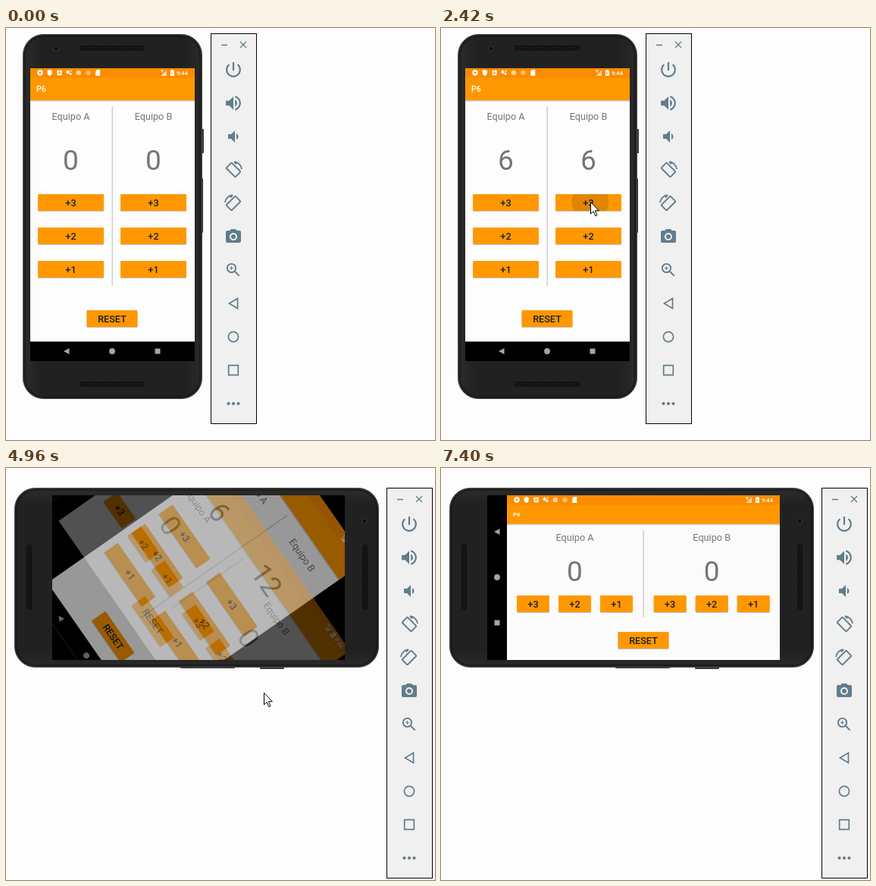
Write an HTML page that moves like this. It is 566 by 543 pixels and loops after 8240 ms.

```html
<!DOCTYPE html>
<html lang="es">
<head>
<meta charset="utf-8">
<title>Marcador</title>
<style>
  html, body { margin: 0; width: 100%; height: 100%; overflow: hidden; background: #fdfdfd }
  #stage { display: block; font-family: Roboto, "Open Sans", sans-serif }
  text { text-anchor: middle }
  .team { font-size: 12.67px; fill: #757575 }
  .score { font-size: 37px; fill: #757575 }
  .label { font-size: 12.67px; font-weight: 500; fill: #1d1d1d }
  .bar { font-weight: 500; fill: #fff; text-anchor: start }
  .line { fill: none; stroke: #607d8b; stroke-width: 1.9 }
</style>
</head>
<body>
<svg id="stage" width="566" height="543" viewBox="0 0 566 543"></svg>
<script>
const LOOP = 8240, TURN = 4200, ROTATE = 4960;

// Spans in which the picture changes: start, end, number of steps
const spans = [[60, 580, 8], [740, 1540, 12], [1620, 1840, 4], [1980, 2800, 12], [2880, 3320, 7],
  [3460, 3680, 4], [3820, 4060, 4], [4200, 4280, 2], [4660, 4800, 3], [4960, 5760, 12],
  [5840, 6660, 12], [6720, 7400, 10]];

// Pointer path: time, x, y
const path = [[60, 431, 498], [580, 90, 318], [900, 90, 318], [1080, 97, 275], [1250, 98, 273],
  [1394, 105, 249], [1540, 103, 232], [1600, 103, 232], [1840, 197, 229], [3400, 197, 229],
  [3533, 236, 227], [3680, 273, 231], [3800, 273, 231], [3930, 304, 216], [4060, 295, 230],
  [4640, 295, 230], [4800, 339, 299], [4940, 339, 299], [5178, 352, 262], [5760, 371, 152],
  [5820, 371, 152], [6100, 164, 140], [6362, 222, 103], [6660, 199, 137], [6700, 199, 137],
  [7400, 530, 545]];

// Button presses: time, team, points
const presses = [[740, 0, 1], [1180, 0, 2], [1540, 0, 3],
  [1980, 1, 3], [2300, 1, 3], [2620, 1, 3], [2960, 1, 3]];

const rect = (x, y, w, h, fill, more = '') =>
  `<rect x="${x}" y="${y}" width="${w}" height="${h}" fill="${fill}" ${more}/>`;
const circle = (x, y, r, more = '') => `<circle cx="${x}" cy="${y}" r="${r}" ${more}/>`;
const text = (x, y, cls, s, more = '') => `<text x="${x}" y="${y}" class="${cls}" ${more}>${s}</text>`;
const button = (cx, cy, w, s) =>
  rect(cx - w / 2, cy - 10, w, 22, '#000', 'opacity=".22" rx="1.5"') +
  rect(cx - w / 2, cy - 11, w, 22, '#ff9800', 'rx="1"') + text(cx, cy + 4.5, 'label', s);

function statusBar(left, right, y) {
  const at = n => left + 13 + n * 12.7;
  return `<g fill="#fff">
    ${circle(at(0), y, 2.4, 'fill="none" stroke="#fff" stroke-width="2"')}
    ${circle(at(0), y, 3.7, 'fill="none" stroke="#fff" stroke-dasharray="1.4 1.5"')}
    <path d="M${at(1)} ${y - 4}l3.2 1.3v2.4q0 3-3.2 4.3q-3.2-1.3-3.2-4.3v-2.4z"/>
    ${rect(at(2) - 3, y - 3.3, 6.4, 6.6, '#fff', 'rx="1"')}
    <path d="M${at(2) - 1.6} ${y + 2}l1.8-4.2l1.8 4.2m-3-1.4h2.4" fill="none" stroke="#fb8c00" stroke-width=".8"/>
    ${circle(at(3) - 1.5, y - 1, 2.2)}${circle(at(3) + 2, y + 1.5, 1.6)}${circle(at(3) + 2.6, y - 2.5, 1)}
    ${circle(at(4), y, 3.3, 'opacity=".6"')}
    ${circle(at(5), y, 3.3, 'opacity=".4"')}
    <path d="M${at(6) - 3} ${y + 4}v-6l2-2h4v8z"/>
    <path d="M${right - 37} ${y - 3.5}v7.5h-7.5z" opacity=".65"/>
    <path d="M${right - 45} ${y - 3}h4m-2 0v3" stroke="#fff" fill="none"/>
    <path d="M${right - 32} ${y - 3}h1.3v-1h2.4v1h1.3v7h-5z"/>
    <path d="M${right - 30} ${y - 1.5}l-.8 2.2h1.4l-.8 2" stroke="#fb8c00" stroke-width=".7" fill="none"/>
    ${text(right - 24, y + 2.9, 'bar', '9:44', 'font-size="7.6"')}</g>`;
}

const appBar = (x, y, w, h, size) =>
  rect(x, y + 13, w, h + 1.2, '#000', 'opacity=".18"') +
  rect(x, y, w, 13, '#fb8c00') + rect(x, y + 12.7, w, h, '#ff9800') +
  statusBar(x, x + w, y + 6) +
  text(x + 8, y + 12.7 + h / 2 + size * .36, 'bar', 'P6', `font-size="${size}"`);

const navIcons = (x, y, dx, dy) => `<g fill="#a5a5a5">
  <path d="M${x - 4} ${y}l7.5-4v8z"/>${circle(x + dx, y + dy, 3.9)}
  ${rect(x + 2 * dx - 3.5, y + 2 * dy - 3.5, 7, 7, '#a5a5a5')}</g>`;

const portrait = rect(32, 53, 217, 386, '#fdfdfd') + appBar(32, 53, 217, 29.6, 10.6) +
  rect(139.5, 103, 1.4, 237, '#cbcbcb') +
  [0, 1].map(i => {
    const cx = 85.5 + 109 * i;
    return text(cx, 121.3, 'team', 'Equipo ' + 'AB'[i]) + text(cx, 187, 'score', 0, `id="score${i}"`) +
      [3, 2, 1].map(n => button(cx, 362 - 44 * n, 87, '+' + n)).join('');
  }).join('') +
  '<svg id="ripple" width="87" height="22"><circle/></svg>' +
  button(140, 383, 67, 'RESET') + rect(32, 413.3, 217, 25.7, '#000') + navIcons(80, 426, 60, 0);

const landscape = rect(61, 36, 386, 217, '#fbfbfb') + appBar(87, 36, 360, 25, 8) +
  rect(266.5, 82, 1.4, 115, '#cbcbcb') +
  [0, 1].map(i => {
    const cx = 176.5 + 180.7 * i;
    return text(cx, 95.5, 'team', 'Equipo ' + 'AB'[i]) + text(cx, 148.5, 'score', 0) +
      [3, 2, 1].map(n => button(cx + (2 - n) * 55, 179, 43, '+' + n)).join('');
  }).join('') +
  button(267, 227, 67, 'RESET') + rect(61, 36, 26, 217, '#000') + navIcons(74, 84, 0, 60);

const speaker = y => rect(97, y, 86, 7, '#101010', 'rx="3"') +
  `<path d="M99 ${y + 2.5}h82m-81 2.5h82" stroke="#303030" stroke-dasharray="1 2"/>`;

const body = rect(255, 133, 6, 32, '#3a3a3a', 'rx="1"') + rect(255, 198, 5, 72, '#303030', 'rx="1"') +
  rect(22.5, 8.5, 236, 480, 'url(#shell)', 'rx="27" stroke="#484848"') +
  rect(25, 11, 231, 475, 'none', 'rx="25" stroke="#191919" stroke-width="1.5"') +
  speaker(23) + speaker(466) + circle(66, 27, 3, 'fill="#0c0c10" stroke="#393939"') +
  rect(32, 53, 217, 386, '#000');

const rotateIcon = `<rect x="7" y="3.5" width="10" height="17" rx="1" class="line" transform="rotate(-45 12 12)"/>
  <path d="M13 1.3A11 11 0 0 1 23 11M13 1.3l3 3" class="line" stroke-width="1.5"/>`;
const icons = [
  '<path transform="translate(-1.2 -1.2) scale(1.1)" d="M13 3h-2v10h2V3zm4.83 2.17l-1.42 1.42C17.99 7.86 19 9.81 19 12c0 3.87-3.13 7-7 7s-7-3.13-7-7c0-2.19 1.01-4.14 2.58-5.42L6.17 5.17C4.23 6.82 3 9.26 3 12c0 4.97 4.03 9 9 9s9-4.03 9-9c0-2.74-1.23-5.18-3.17-6.83z"/>',
  '<path transform="translate(-1.2 -1.2) scale(1.1)" d="M3 9v6h4l5 5V4L7 9H3zm13.5 3c0-1.77-1.02-3.29-2.5-4.03v8.05c1.48-.73 2.5-2.25 2.5-4.02zM14 3.23v2.06c2.89.86 5 3.54 5 6.71s-2.11 5.85-5 6.71v2.06c4.01-.91 7-4.49 7-8.77s-2.99-7.86-7-8.77z"/>',
  '<path d="M18.5 12c0-1.77-1.02-3.29-2.5-4.03v8.05c1.48-.73 2.5-2.25 2.5-4.02zM5 9v6h4l5 5V4L9 9H5z"/>',
  rotateIcon,
  `<g transform="matrix(-1 0 0 1 24 0)">${rotateIcon}</g>`,
  '<path d="M9 2L7.2 4H4a2 2 0 0 0-2 2v12a2 2 0 0 0 2 2h16a2 2 0 0 0 2-2V6a2 2 0 0 0-2-2h-3.2L15 2z"/><circle cx="12" cy="12" r="4" fill="none" stroke="#f0f0f0" stroke-width="2"/>',
  '<circle cx="9.5" cy="9.5" r="5.6" class="line"/><path class="line" d="M14 14l5.7 5.7" stroke-width="2.4"/><path class="line" d="M7 9.5h5m-2.5-2.5v5" style="stroke-width:1.1"/>',
  '<path class="line" d="M6.5 12L17.5 5.5v13z" style="stroke-width:1.7"/>',
  circle(12, 12, 6.6, 'class="line" style="stroke-width:1.7"'),
  '<path class="line" d="M5.7 5.7h12.6v12.6H5.7z" style="stroke-width:1.7"/>',
  [5.5, 12, 18.5].map(x => circle(x, 12, 2.1)).join('')
];
const toolbar = rect(270.5, 7.5, 60, 514, '#f0f0f0', 'stroke="#000"') +
  '<path class="line" style="stroke-width:1.3" d="M284 22.5h8m17-4.5l8 8m0-8l-8 8"/><g fill="#607d8b">' +
  icons.map((icon, i) => `<g transform="translate(288 ${43 + 44 * i})">${icon}</g>`).join('') + '</g>';

stage.innerHTML = `<defs>
    <linearGradient id="shell"><stop stop-color="#2c2c2c"/><stop offset=".1" stop-color="#212121"/>
      <stop offset=".9" stop-color="#212121"/><stop offset="1" stop-color="#2a2a2a"/></linearGradient>
    <clipPath id="tall">${rect(32, 53, 217, 386)}</clipPath>
    <clipPath id="wide">${rect(61, 36, 386, 217)}</clipPath></defs>
  <g id="phone">${body}<g clip-path="url(#tall)"><g id="oldScreen">${portrait}</g></g></g>
  <g clip-path="url(#wide)"><g id="newScreen">${landscape}</g></g>
  <g id="tools">${toolbar}</g>
  <path id="pointer" d="M.5.5v15.5l3.6-3.4l2.6 6.1l2.3-1l-2.6-5.9h5z" fill="#fff" stroke="#000"/>`;

const $ = id => document.getElementById(id);
const set = (el, attrs) => { for (const k in attrs) el.setAttribute(k, attrs[k]); };
const clamp = v => Math.max(0, Math.min(1, v));

function stepTime(t) {
  const span = spans.findLast(s => s[0] <= t);
  if (!span) return 0;
  const [a, b, n] = span, d = (b - a) / (n - 1);
  return Math.min(b, a + Math.floor((t - a) / d + .1) * d);
}

function pointerAt(t) {
  const i = Math.max(1, path.findIndex(p => p[0] >= t));
  const [a, x, y] = path[i - 1], [b, u, v] = path[i], p = clamp((t - a) / (b - a));
  return [Math.round(x + (u - x) * p), Math.round(y + (v - y) * p)];
}

function draw(t) {
  const [x, y] = pointerAt(t);
  set($('pointer'), { transform: `translate(${x} ${y})`, visibility: t < 60 || t >= 7400 ? 'hidden' : 'visible' });

  const total = [0, 0];
  for (const [at, team, points] of presses) if (t >= at + 75) total[team] += points;
  total.forEach((n, i) => { $('score' + i).textContent = n; });

  const last = presses.findLast(p => p[0] <= t), age = last ? (t - last[0]) / 350 : 1;
  set($('ripple'), { visibility: age < 1 ? 'visible' : 'hidden' });
  if (age < 1) {
    const left = 42 + 109 * last[1], top = 351 - 44 * last[2];
    set($('ripple'), { x: left, y: top });
    set($('ripple').firstChild, { cx: x - left, cy: y - top, r: 8 + 45 * age, opacity: .2 * (1 - age) });
  }

  const turned = t >= TURN;
  set($('phone'), { transform: turned ? 'matrix(0 1 -1 0 500 4)' : '' });
  set($('tools'), { transform: turned ? 'translate(232 19)' : '' });

  const p = t < ROTATE ? 0 : clamp((t - ROTATE + 60) / 300), angle = 90 * (1 - p) ** 2.2;
  set($('oldScreen'), { transform: `rotate(${angle - 90} 140.5 246)`, opacity: clamp(1 - 2 * p) });
  set($('newScreen'), { transform: `rotate(${angle} 254 144.5)`, opacity: clamp(1.6 * p) });
}

const start = performance.now();
function tick() {
  draw(stepTime((performance.now() - start) % LOOP));
  requestAnimationFrame(tick);
}
tick();
</script>
</body>
</html>
```
